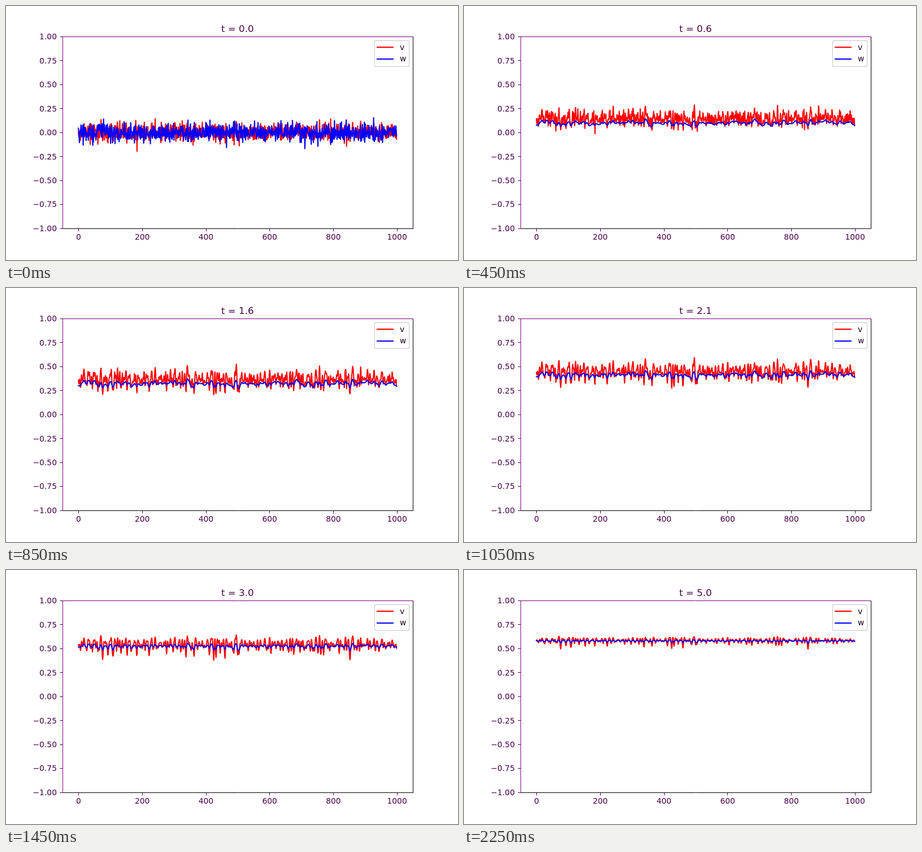
Animation of 800 by 450 pixels, one loop 2.5 s. Source, as an HTML page with a canvas:

```html
<!DOCTYPE html>
<html lang="en">
<head>
<meta charset="utf-8">
<title>Reaction-diffusion line plot</title>
<style>
html, body { margin: 0; width: 100%; height: 100%; overflow: hidden; background: #fff; }
canvas { display: block; }
</style>
</head>
<body>
<canvas id="stage" width="800" height="450"></canvas>
<script>
const ctx = document.getElementById('stage').getContext('2d');
const N = 1000, LAST = 41, SUBSTEPS = 24, END = 5;
const LEFT = 100.5, RIGHT = 720.5, TOP = 54.5, BOTTOM = 394.5;
const PURPLE = '#800080', INK = '#480048';
const px = i => 128.18 + i * 0.56364;
const py = value => 223.875 - value * 169.875;

let seed = 7;
function random() {
  seed = (seed + 0x6D2B79F5) | 0;
  let r = Math.imul(seed ^ (seed >>> 15), 1 | seed);
  r = (r + Math.imul(r ^ (r >>> 7), 61 | r)) ^ r;
  return ((r ^ (r >>> 14)) >>> 0) / 4294967296;
}
const gauss = () => Math.sqrt(-2 * Math.log(1 - random())) * Math.cos(2 * Math.PI * random());
const noise = sigma => Float64Array.from({ length: N }, () => sigma * gauss());

// dv/dt = a v" + v - v^3 - w + k,  tau dw/dt = b w" + v - w
function simulate() {
  const a = 0.6, b = 14, tau = 0.2, k = 0.2, dt = END / LAST / SUBSTEPS;
  let v = noise(0.05), w = noise(0.05);
  const states = [{ v, w }];
  const bend = (f, i) => f[Math.max(i - 1, 0)] + f[Math.min(i + 1, N - 1)] - 2 * f[i];
  for (let step = 1; step <= LAST * SUBSTEPS; step++) {
    const nextV = new Float64Array(N), nextW = new Float64Array(N);
    for (let i = 0; i < N; i++) {
      nextV[i] = v[i] + dt * (a * bend(v, i) + v[i] - v[i] ** 3 - w[i] + k);
      nextW[i] = w[i] + dt / tau * (b * bend(w, i) + v[i] - w[i]);
    }
    v = nextV;
    w = nextW;
    if (step % SUBSTEPS === 0) states.push({ v, w });
  }
  return states;
}

function line(x1, y1, x2, y2, color, width = 1) {
  ctx.strokeStyle = color;
  ctx.lineWidth = width;
  ctx.beginPath();
  ctx.moveTo(x1, y1);
  ctx.lineTo(x2, y2);
  ctx.stroke();
}

function text(label, x, y, align, size = 13.89, color = INK) {
  ctx.font = `${size}px "DejaVu Sans", sans-serif`;
  ctx.textAlign = align;
  ctx.fillStyle = color;
  ctx.fillText(label, x, y);
}

function curve(values, color) {
  ctx.strokeStyle = color;
  ctx.lineWidth = 2.08;
  ctx.lineJoin = 'round';
  ctx.lineCap = 'square';
  ctx.beginPath();
  values.forEach((value, i) => ctx.lineTo(px(i), py(value)));
  ctx.stroke();
  ctx.lineCap = 'butt';
}

function drawAxes() {
  const crisp = n => Math.round(n) + 0.5;
  for (let i = -4; i <= 4; i++) {
    const y = py(i / 4);
    line(95.5, crisp(y), LEFT, crisp(y), INK);
    text((i / 4).toFixed(2).replace('-', '\u2212'), 90, Math.round(y + 5.2), 'right');
  }
  for (let n = 0; n <= 1000; n += 200) {
    const x = px(n);
    line(crisp(x), BOTTOM, crisp(x), 399.5, INK);
    text(n, x + 0.3, 414, 'center');
  }
  line(LEFT, TOP, LEFT, BOTTOM, PURPLE);
  line(LEFT, TOP, RIGHT, TOP, PURPLE);
  line(RIGHT, TOP, RIGHT, BOTTOM + 0.5, '#000');
  line(LEFT, BOTTOM, RIGHT, BOTTOM, '#000');
}

function drawLegend() {
  ctx.fillStyle = '#fff';
  ctx.strokeStyle = '#ccc';
  ctx.lineWidth = 1.2;
  ctx.beginPath();
  ctx.roundRect(652.3, 61.4, 61.4, 45.8, 3);
  ctx.fill();
  ctx.stroke();
  line(656, 73, 686, 73, '#f00', 2.08);
  line(656, 94, 686, 94, '#00f', 2.08);
  text('v', 697, 78, 'left', 13.89, '#1a001a');
  text('w', 697, 98.4, 'left', 13.89, '#1a001a');
}

const states = simulate();

function draw() {
  const ms = performance.now() % 2500;
  const index = ms < 250 ? 0 : Math.min(LAST, 1 + Math.floor((ms - 250) / 50));
  ctx.fillStyle = '#fff';
  ctx.fillRect(0, 0, 800, 450);
  curve(states[index].v, '#f00');
  curve(states[index].w, '#00f');
  drawAxes();
  text('t = ' + (index * END / LAST).toFixed(1), 409.8, 46, 'center', 16.67);
  drawLegend();
  requestAnimationFrame(draw);
}
draw();
</script>
</body>
</html>
```
